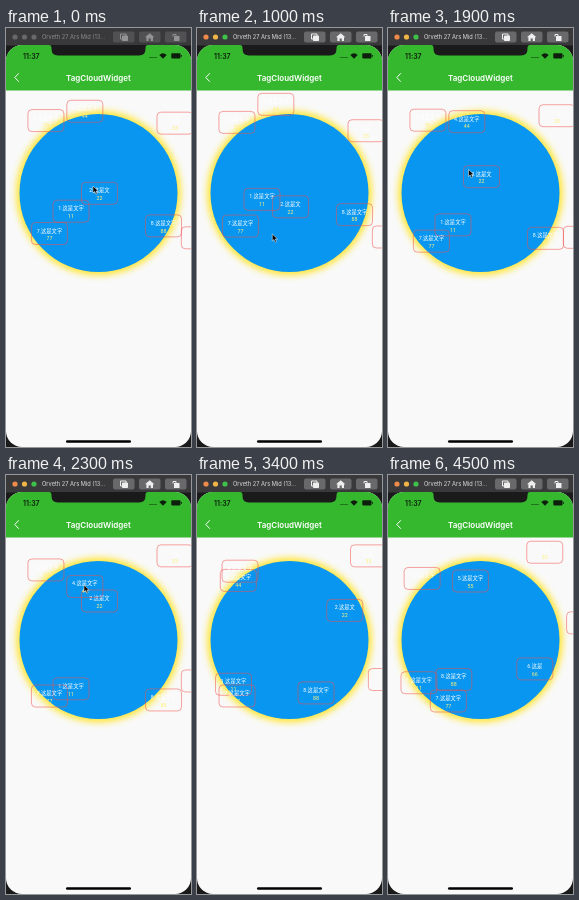
Write an HTML page that moves like this. It is 185 px wide and 419 px high and loops after 4600 ms.

```html
<!DOCTYPE html>
<html lang="en">
<head>
<meta charset="utf-8">
<title>TagCloudWidget</title>
<style>
html, body { margin: 0; width: 100%; height: 100%; overflow: hidden; background: #1a1a1b; }
svg { display: block; width: 185px; height: 419px; }
text { font-family: Inter, Roboto, sans-serif; }
.tag rect { fill: none; stroke: #f0504c; stroke-opacity: .62; stroke-width: .85; }
.tag text { font: 5.3px Roboto, "Noto Sans CJK SC", "Noto Sans CJK", sans-serif; text-anchor: middle; fill: #fff; }
.tag .num { fill: #fff07a; }
.lights circle:nth-child(1) { fill: #ee8b4c; }
.lights circle:nth-child(2) { fill: #f0b548; }
.lights circle:nth-child(3) { fill: #3dc04c; }
.inactive .lights circle { fill: #68686a; }
.inactive .tools { opacity: .5; }
</style>
</head>
<body>
<svg viewBox="0 0 185 419">
  <defs>
    <filter id="soft" x="-20%" y="-20%" width="140%" height="140%"><feGaussianBlur stdDeviation="3.4"/></filter>
    <clipPath id="screen"><rect y="17" width="185" height="402" rx="16"/></clipPath>
  </defs>

  <!-- simulator window bar -->
  <g id="bar">
    <rect width="185" height="17.5" fill="#39383a"/>
    <g class="lights">
      <circle cx="9" cy="9" r="2.6"/>
      <circle cx="18.5" cy="9" r="2.6"/>
      <circle cx="28" cy="9" r="2.6"/>
    </g>
    <g class="tools">
      <text x="36" y="11.3" font-size="5.7" fill="#dedede">Orveth 27 Ars Mid (13...</text>
      <g fill="#69686a">
        <rect x="107" y="3.5" width="21.5" height="11" rx="2"/>
        <rect x="133" y="3.5" width="21.5" height="11" rx="2"/>
        <rect x="159" y="3.5" width="21.5" height="11" rx="2"/>
      </g>
      <g fill="none" stroke="#eee">
        <path d="M114.5 6h5.5v5h-5.5z"/>
        <path d="M116.5 8h5v4.5h-5z" fill="#eee"/>
        <path d="M170 8.5v-2h-3v2"/>
      </g>
      <path d="M139 9.2 143.7 5.2 148.4 9.2H147v3.8h-2.2v-2.4h-2.2v2.4h-2.2V9.2zM168 8h5.5v5H168z" fill="#eee"/>
    </g>
  </g>

  <g clip-path="url(#screen)">
    <rect y="17" width="185" height="402" fill="#f9f9f9"/>
    <rect y="17" width="185" height="45.5" fill="#35b72e"/>
    <path d="M43 17q2.5 0 2.5 3v1q0 6.5 6.5 6.5h81q6.5 0 6.5-6.5v-1q0-3 2.5-3z" fill="#1a1a1b"/>
    <text x="17" y="30.6" font-size="7" font-weight="600" fill="#0d1f0c">11:37</text>
    <g fill="#0d1f0c">
      <circle cx="144" cy="29.5" r=".6"/><circle cx="146" cy="29.5" r=".6"/>
      <circle cx="148" cy="29.5" r=".6"/><circle cx="150" cy="29.5" r=".6"/>
      <path d="M153.3 27q3.7-3.4 7.4 0l-3.7 3.8z"/>
      <rect x="165.3" y="25.3" width="9.2" height="5.2" rx="1"/>
      <path d="M175 27h.9v1.8H175z"/>
    </g>
    <path d="M12.8 45.3 8.8 49.5l4 4.2" fill="none" stroke="#fff"/>
    <text x="92.5" y="52.7" font-size="8" font-weight="600" fill="#fff" text-anchor="middle">TagCloudWidget</text>

    <circle cx="92.5" cy="165" r="82.5" fill="#ffe63c" filter="url(#soft)"/>
    <circle cx="92.5" cy="165" r="79" fill="#0896f0"/>
    <g id="tags"></g>
    <rect x="60" y="412.3" width="65" height="2.4" rx="1.2" fill="#000"/>
    <path id="cursor" d="M0 0v7l1.7-1.5 1.2 2.7 1.3-.6-1.2-2.6h2.3z" fill="#000" stroke="#fff" stroke-width=".5"/>
  </g>
</svg>
<script>
const LOOP = 4600, STEP = 100;
const RADIUS = 97, CENTER = { x: 112, y: 157 };
const RAD = Math.PI / 180;

// Resting place of each tag on the sphere: side is the angle off the middle
// plane, turn the angle around the horizontal axis.
const tags = [
  { label: "1.这是文字", side: -29, turn: 18 },
  { label: "2.这是文", side: -11, turn: 175 },
  { label: "3.这", side: 36, turn: -128 },
  { label: "4.这是文字", side: -20, turn: -54 },
  { label: "5.这是文字", side: -48, turn: -97 },
  { label: "6.这是", side: 57, turn: 88 },
  { label: "7.这是文字", side: -45, turn: 45 },
  { label: "8.这是文字", side: 28, turn: 28.5 }
];

// Each drag turns the sphere by yaw and pitch degrees and takes the pointer to x, y.
const pointer = { x: 87, y: 158 };
const drags = [
  { end: 500, yaw: 0, pitch: -12.5, x: 67.5, y: 239 },
  { end: 1500, yaw: 0, pitch: 8.5, x: 83, y: 173 },
  { end: 2300, yaw: 0, pitch: 28, x: 78, y: 110 },
  { end: 2900, yaw: -18, pitch: -1.5, x: 44, y: 215 },
  { end: 3800, yaw: -29, pitch: -8, x: -90, y: 215 },
  { end: 4500, yaw: -27, pitch: -6.5, x: -90, y: 215 }
];

function spherePoint({ side, turn }) {
  const ring = RADIUS * Math.cos(side * RAD);
  return {
    x: RADIUS * Math.sin(side * RAD),
    y: ring * Math.sin(turn * RAD),
    z: ring * Math.cos(turn * RAD)
  };
}

// Trackball turn: rolls the drag direction into depth.
function roll({ x, y, z }, yaw, pitch) {
  const size = Math.hypot(yaw, pitch) || 1;
  const ux = yaw / size, uy = pitch / size;
  const sin = Math.sin(size * RAD), cos = Math.cos(size * RAD);
  const along = x * ux + y * uy;
  const shift = along * cos + z * sin - along;
  return { x: x + ux * shift, y: y + uy * shift, z: z * cos - along * sin };
}

function add(parent, name, attrs, text = "") {
  const el = document.createElementNS("http://www.w3.org/2000/svg", name);
  for (const key in attrs) el.setAttribute(key, attrs[key]);
  el.textContent = text;
  return parent.appendChild(el);
}

function place(el, x, y) {
  el.setAttribute("transform", `translate(${x} ${y})`);
}

const bar = document.getElementById("bar");
const cursor = document.getElementById("cursor");
const layer = document.getElementById("tags");

tags.forEach((tag, i) => {
  tag.el = add(layer, "g", { class: "tag" });
  add(tag.el, "rect", { x: -18, y: -11, width: 36, height: 22, rx: 4 });
  add(tag.el, "text", { y: -1 }, tag.label);
  add(tag.el, "text", { y: 6.8, class: "num" }, (i + 1) * 11);
});

function draw(t) {
  bar.classList.toggle("inactive", t < 2 * STEP);
  let points = tags.map(spherePoint);
  let { x, y } = pointer;
  let start = 0;
  for (const drag of drags) {
    const part = Math.min((t - start) / (drag.end - start), 1);
    if (part <= 0) break;
    points = points.map(p => roll(p, drag.yaw * part, drag.pitch * part));
    x += (drag.x - x) * part;
    y += (drag.y - y) * part;
    start = drag.end;
  }
  points.forEach((p, i) => place(tags[i].el, CENTER.x + p.x, CENTER.y + p.y));
  place(cursor, x, y);
}

let origin;
function tick(now) {
  origin ??= now;
  draw(Math.floor((now - origin) % LOOP / STEP) * STEP);
  requestAnimationFrame(tick);
}
draw(0);
requestAnimationFrame(tick);
</script>
</body>
</html>
```
